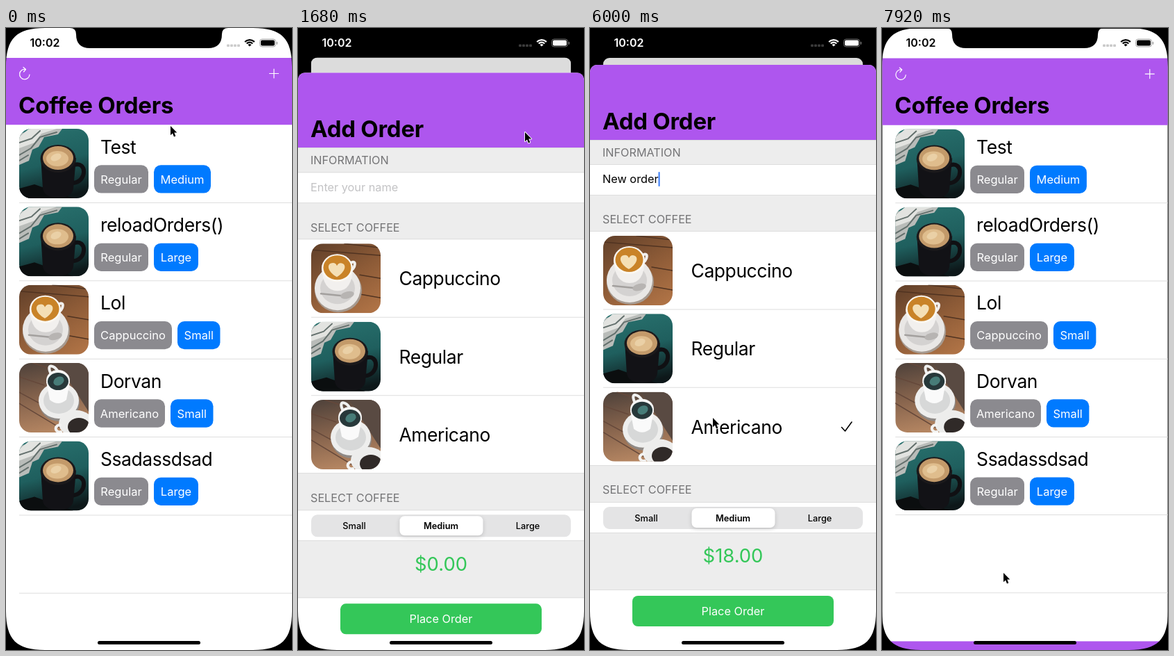
Write an HTML page with a canvas that moves like this. It is 412 by 895 pixels and loops after 8 s.

```html
<!DOCTYPE html>
<html lang="en">
<head>
<meta charset="utf-8">
<title>Coffee Orders</title>
<style>
  html, body { margin: 0; width: 100%; height: 100%; overflow: hidden; background: #000; }
  canvas { display: block; width: 412px; height: 895px; }
</style>
</head>
<body>
<canvas id="stage"></canvas>
<script>
const W = 412, H = 895, LOOP = 8000, STEP = 80;
const SHEET_TOP = 53, OPEN_AT = 1344, CLOSE_AT = 7591, DIM_LEAD = 24;
const PURPLE = '#ae56ee', GREEN = '#34c759', BLUE = '#007aff', GRAY = '#8b8a8f';
const PANEL = '#ededed', LINE = '#dedede';

const canvas = document.getElementById('stage');
const ctx = canvas.getContext('2d');
const ratio = window.devicePixelRatio || 1;
canvas.width = W * ratio;
canvas.height = H * ratio;

// ---------- drawing helpers ----------
function rect(x, y, w, h, color, radius = 0) {
  ctx.fillStyle = color;
  ctx.beginPath();
  ctx.roundRect(x, y, w, h, radius);
  ctx.fill();
}

function oval(x, y, rx, ry, color, angle = 0) {
  ctx.fillStyle = color;
  ctx.beginPath();
  ctx.ellipse(x, y, rx, ry, angle, 0, Math.PI * 2);
  ctx.fill();
}

function shape(path, color) {
  ctx.fillStyle = color;
  ctx.fill(new Path2D(path));
}

function stroke(path, color, width) {
  ctx.strokeStyle = color;
  ctx.lineWidth = width;
  ctx.lineCap = ctx.lineJoin = 'round';
  ctx.stroke(new Path2D(path));
}

function gradient(x0, y0, x1, y1, ...colors) {
  const g = ctx.createLinearGradient(x0, y0, x1, y1);
  colors.forEach((c, i) => g.addColorStop(i / (colors.length - 1), c));
  return g;
}

// y is the middle of the capital letters
function text(str, x, y, size, color, { weight = 400, align = 'left', spacing = 0 } = {}) {
  ctx.font = `${weight} ${size}px Inter, Roboto, sans-serif`;
  ctx.letterSpacing = spacing + 'px';
  ctx.textAlign = align;
  ctx.fillStyle = color;
  ctx.fillText(str, x, y + size * 0.364);
}

const heading = (str, y) => text(str, 18, y, 33, '#000', { weight: 700, spacing: -0.25 });
const rowTitle = (str, x, y) => text(str, x, y, 26.5, '#000', { spacing: -0.45 });

// ---------- coffee pictures, each 100 x 100 ----------
const pictures = {
  Regular() {
    rect(0, 0, 100, 100, gradient(30, 0, 55, 100, '#28706d', '#1f5f5e', '#0d1719'));
    shape('M0 8L20 0H62L56 8L36 12L28 26L19 30L14 46L0 52Z', '#b9bcb9');
    shape('M14 0H54L32 7L22 20L0 28V12Z', '#e2e3e0');
    stroke('M0 20L18 14L30 3M0 38L17 28L30 12L54 5M0 46L13 38', '#64706d', 2);
    shape('M22 80L78 100H0V86Z', '#0b0e0f');
    stroke('M79 52C98 46 98 76 78 78', '#101013', 6);
    shape('M31 40L34 86Q36 99 56 99Q76 99 78 86L82 42Z', '#121216');
    oval(56, 43, 25.5, 20, '#1b191b');
    oval(56, 42, 22, 17, '#c39a6a');
    oval(55, 43, 16, 11, '#dfbd8d');
    oval(53, 41, 8, 5, '#ead0a6', -0.4);
  },
  Cappuccino() {
    rect(0, 0, 100, 100, gradient(20, 0, 80, 100, '#66432b', '#8d5b37', '#ae7245'));
    stroke('M0 9L100 17M48 0L100 6M70 45L100 50M66 72L100 78', '#503321', 1.5);
    oval(39, 67, 34, 32, '#a69a90');
    oval(38, 64, 33, 32, '#e9e7e5');
    oval(38, 64, 25, 23, '#d4d2d1');
    stroke('M53 31C67 18 65 37 54 41', '#f1efed', 4);
    shape('M15 35Q17 68 38 68Q59 68 60 35Z', '#f2f0ee');
    oval(37.5, 35, 22.5, 20, '#faf7f1');
    oval(37.5, 34.5, 20, 17.5, '#c98328');
    shape('M37 48C23 40 22 29 30 28Q35 27 37 32Q40 26 46 29C52 33 46 43 37 48Z', '#f4dfb5');
    stroke('M14 72L44 75', '#a3a09e', 2.5);
    oval(52, 74, 10, 5, '#b7b4b2', -0.25);
  },
  Americano() {
    rect(0, 0, 100, 100, gradient(20, 0, 40, 100, '#51433b', '#87644d', '#b58662'));
    shape('M55 0H100V70Z', '#594a42');
    stroke('M0 20L36 32M0 42L100 96M0 58L70 100M20 0L44 8', '#65483a', 1.5);
    oval(58, 57, 29, 27, '#8f8985');
    oval(57, 54, 29, 26, '#eeeeed');
    oval(57, 54, 22, 19, '#d7d8d8');
    stroke('M45 14C39 0 50 3 56 12', '#f0f0ef', 4);
    shape('M39 27L44 53Q56 63 68 53L73 27Z', '#fafafa');
    oval(56, 25, 17, 15, '#f6f6f5');
    oval(56, 26.5, 15, 12.5, '#27383a');
    oval(57, 26, 8, 6, '#477c78', -0.5);
    oval(82, 87, 25, 19, '#ededec');
    oval(86, 92, 16, 13, '#302a28');
    stroke('M59 89C49 90 52 101 60 99', '#f3f3f2', 4);
  }
};

function picture(kind, x, y) {
  ctx.save();
  ctx.beginPath();
  ctx.roundRect(x, y, 100, 100, 17);
  ctx.clip();
  ctx.translate(x, y);
  pictures[kind]();
  ctx.restore();
}

// ---------- order list ----------
const orders = [
  ['Test', 'Regular', 'Medium'],
  ['reloadOrders()', 'Regular', 'Large'],
  ['Lol', 'Cappuccino', 'Small'],
  ['Dorvan', 'Americano', 'Small'],
  ['Ssadassdsad', 'Regular', 'Large']
];
const pillWidth = { Regular: 78, Cappuccino: 112, Americano: 102, Small: 61.5, Medium: 82, Large: 64 };

function pill(label, x, y, color) {
  const width = pillWidth[label];
  rect(x, y, width, 40.3, color, 10);
  text(label, x + width / 2, y + 20.3, 16.5, '#fff', { align: 'center' });
  return x + width + 8;
}

function drawList() {
  rect(0, 0, W, H, '#fff');
  rect(0, 43, W, 96.3, PURPLE);
  stroke('M28 59.5A7.2 7.2 0 1 0 34 67M25 56.5L28.5 59.5L25.5 63', '#fff', 1.2);
  stroke('M379.5 65.5H392.5M386 59V72', '#fff', 1.2);
  heading('Coffee Orders', 111);
  for (let i = 0; i < 6; i++) {
    const y = 139 + i * 112.35;
    rect(19, y + 112, W, 1, LINE);
    if (!orders[i]) continue;
    const [name, coffee, size] = orders[i];
    picture(coffee, 19, y + 6);
    rowTitle(name, 136, y + 32);
    pill(size, pill(coffee, 127, y + 58.3, GRAY), y + 58.3, BLUE);
  }
}

// ---------- order form ----------
const TYPED = 'New order';
const keyTimes = [3680, 3920, 4080, 4240, 4480, 4720, 4960, 5200, 5440];
const FOCUS_AT = 3040, COFFEE_AT = 5920, SIZE_AT = 6560, PRESS_AT = 7520;

function sectionBand(y, h, label, labelY) {
  rect(0, y, W, h, PANEL);
  rect(0, y, W, 1, LINE);
  rect(0, y + h - 1, W, 1, LINE);
  if (label) text(label, 18, labelY, 16.2, '#747476');
}

function drawNameField(t) {
  const count = keyTimes.filter(k => k <= t).length;
  const value = TYPED.slice(0, count);
  text(value || 'Enter your name', 18, 217.5, 16.3, value ? '#000' : '#c3c3c5');
  const lastInput = count ? keyTimes[count - 1] : FOCUS_AT;
  const focused = t >= FOCUS_AT && t < PRESS_AT;
  if (focused && (t - lastInput) % 1000 < 700) {
    rect(18 + (value ? ctx.measureText(value).width : 0), 207, 2, 21, '#3478f6', 1);
  }
}

function drawSizePicker(t) {
  const slide = smooth((t - SIZE_AT) / 240);
  const selected = t < SIZE_AT ? 1 : 0;
  rect(19, 689, 374, 32, '#e4e4e5', 9);
  if (!selected) rect(268, 697, 1, 16, '#cfcfd1');
  ctx.save();
  ctx.shadowColor = 'rgba(0,0,0,.16)';
  ctx.shadowBlur = 6 * ratio;
  ctx.shadowOffsetY = 2 * ratio;
  rect(146.5 - 125.5 * slide, 691, 120, 28, '#fff', 7);
  ctx.restore();
  ['Small', 'Medium', 'Large'].forEach((label, i) =>
    text(label, 81 + i * 125, 705, 12.8, '#000', { weight: i === selected ? 600 : 500, align: 'center' }));
}

function drawForm(t) {
  ctx.beginPath();
  ctx.roundRect(0, SHEET_TOP, W, H, 10);
  ctx.clip();
  rect(0, SHEET_TOP, W, H, '#fff');
  rect(0, SHEET_TOP, W, 108, PURPLE);
  heading('Add Order', 133.5);
  sectionBand(161, 36, 'INFORMATION', 179);
  drawNameField(t);

  sectionBand(240, 53, 'SELECT COFFEE', 275.5);
  ['Cappuccino', 'Regular', 'Americano'].forEach((coffee, i) => {
    const y = 293 + i * 112.35;
    picture(coffee, 19, y + 6);
    rowTitle(coffee, 145.5, y + 56.5);
    if (i < 2) rect(19, y + 111.5, W, 1, LINE);
  });
  if (t >= COFFEE_AT) stroke('M362.5 574.5L367.5 580L377 567', '#000', 1.6);

  sectionBand(629, 54, 'SELECT COFFEE', 664.5);
  drawSizePicker(t);

  sectionBand(726, 83);
  const price = t < COFFEE_AT ? '$0.00' : t < SIZE_AT + 80 ? '$18.00' : '$17.00';
  text(price, 206, 759.5, 27.4, GREEN, { align: 'center' });
  rect(61, 817, 290, 44, GREEN, 8);
  const pressed = t >= PRESS_AT && t < PRESS_AT + 160;
  text('Place Order', 206, 839, 16.3, pressed ? 'rgba(255,255,255,.45)' : '#fff', { align: 'center' });
}

// ---------- device ----------
function drawStatusBar(open) {
  const mix = (a, b) => { const v = Math.round(a + (b - a) * open); return `rgb(${v},${v},${v})`; };
  const ink = mix(0, 255);
  text('10:02', 34.5, 21.5, 16, ink, { weight: 600 });
  for (let i = 0; i < 4; i++) rect(318 + i * 5, 23.5, 4, 3.5, mix(204, 58), 1);
  for (const radius of [9.4, 5.8, 1.7]) {
    ctx.beginPath();
    ctx.arc(351, 26.5, radius, -Math.PI * 0.76, -Math.PI * 0.24);
    ctx.strokeStyle = ink;
    ctx.lineCap = 'butt';
    ctx.lineWidth = radius < 3 ? 3.4 : 2.2;
    ctx.stroke();
  }
  ctx.strokeStyle = mix(165, 110);
  ctx.lineWidth = 1;
  ctx.beginPath();
  ctx.roundRect(365.5, 16, 23, 11, 3.5);
  ctx.stroke();
  rect(367, 17.5, 20, 8, ink, 2);
  rect(389.7, 19.7, 1.5, 4, mix(165, 110), 1);
}

function drawBezel() {
  // smooth corners, mirrored into all four
  for (const [sx, sy] of [[1, 1], [-1, 1], [1, -1], [-1, -1]]) {
    ctx.save();
    ctx.translate(sx < 0 ? W : 0, sy < 0 ? H : 0);
    ctx.scale(sx, sy);
    shape('M0 0V56C0 15 15 0 56 0Z', '#000');
    ctx.restore();
  }
  shape('M92 0Q101 0 101 9Q101 29 121 29H291Q311 29 311 9Q311 0 320 0Z', '#000');
  rect(132, 882, 148, 5, '#000', 2.5);
}

// ---------- motion ----------
// pointer stops: time, x, y
const pointerStops = [
  [80, 237, 141], [960, 381, 68], [1360, 381, 68], [1680, 327, 150],
  [2640, 115, 217], [3040, 115, 217], [3440, 141, 323], [5520, 141, 323],
  [5760, 177, 561], [6080, 177, 561], [6480, 80, 700], [6800, 80, 700],
  [7360, 183, 842], [7600, 183, 842], [7920, 175, 784]
];

function smooth(k) {
  k = Math.min(1, Math.max(0, k));
  return k * k * (3 - 2 * k);
}

// critically damped spring from 0 to 1
function spring(ms) {
  const k = Math.max(0, ms) * 0.01875;
  return 1 - (1 + k) * Math.exp(-k);
}

const openness = t => spring(t - OPEN_AT) - spring(t - CLOSE_AT);

function drawPointer(t) {
  let [, x, y] = pointerStops[0];
  for (let i = 1; i < pointerStops.length; i++) {
    const [t0, x0, y0] = pointerStops[i - 1];
    const [t1, x1, y1] = pointerStops[i];
    if (t < t0) break;
    const k = smooth((t - t0) / (t1 - t0));
    x = x0 + (x1 - x0) * k;
    y = y0 + (y1 - y0) * k;
  }
  ctx.save();
  ctx.translate(x, y);
  const arrow = 'M0 0V13.2L3 10.5L5 15.5L7.3 14.6L5.3 9.6H9.3Z';
  stroke(arrow, '#fff', 1.8);
  shape(arrow, '#000');
  ctx.restore();
}

function draw(t) {
  const open = openness(t);
  ctx.setTransform(ratio, 0, 0, ratio, 0, 0);
  rect(0, 0, W, H, '#000');

  ctx.save();
  const scale = 1 - 0.092 * open;
  ctx.translate(W / 2 * (1 - scale), 43 * open);
  ctx.scale(scale, scale);
  ctx.beginPath();
  ctx.roundRect(0, 0, W, H, open > 0.001 ? 10 : 0);
  ctx.clip();
  drawList();
  rect(0, 0, W, H, `rgba(0,0,0,${0.14 * openness(t + DIM_LEAD)})`);
  ctx.restore();

  if (open > 0.0005) {
    ctx.save();
    ctx.translate(0, (H - SHEET_TOP) * (1 - open));
    drawForm(t);
    ctx.restore();
  }
  drawBezel();
  drawStatusBar(open);
  drawPointer(t);
}

const start = performance.now();
function tick() {
  const t = (performance.now() - start) % LOOP;
  draw(Math.floor(t / STEP) * STEP);
  requestAnimationFrame(tick);
}
tick();
</script>
</body>
</html>
```
